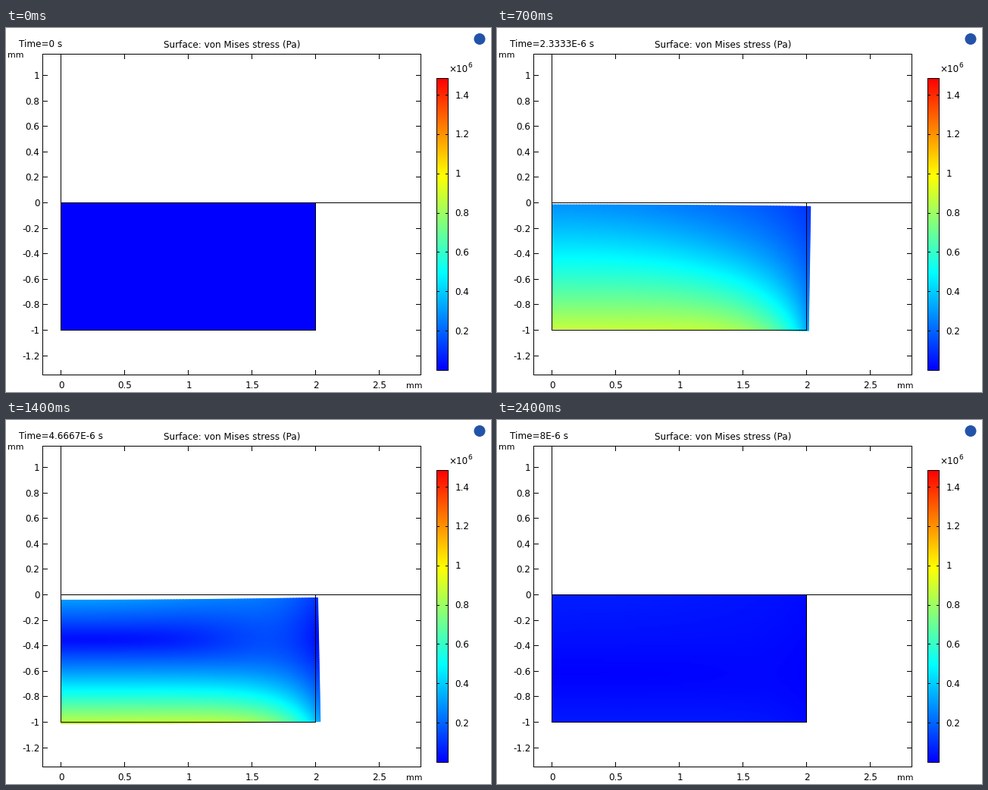
A matplotlib script for the animation above (2500 ms loop, 640 px wide and 480 px high).

```python
import numpy as np
import matplotlib.pyplot as plt
from matplotlib.animation import FuncAnimation
from matplotlib.colors import LinearSegmentedColormap
from matplotlib.patches import Circle, Rectangle

W, H, DPI = 640, 480, 100
PT = 72 / DPI                 # points per pixel
X0, Y0, UNIT = 72, 230, 168   # pixel of the point (0, 0), pixels per mm
VMAX = 1.485                  # MPa at the top of the colour bar
FRAMES = 25

plt.rcParams["font.family"] = "DejaVu Sans"
rainbow = LinearSegmentedColormap.from_list(
    "rainbow", ["#0000ff", "#00ffff", "#ffff00", "#ff0000"], N=512)

fig = plt.figure(figsize=(W / DPI, H / DPI), dpi=DPI, facecolor="white")
ax = fig.add_axes([0, 0, 1, 1])
ax.set_xlim(0, W)
ax.set_ylim(H, 0)
ax.axis("off")


# Whole pixel coordinates: hairlines snap to the centre of that pixel.
def line(xs, ys):
    ax.plot(xs, ys, color="black", lw=PT, antialiased=False, zorder=3)


def box(x, y, w, h):
    ax.add_patch(Rectangle((x, y), w, h, fill=False, ec="black", lw=PT,
                           antialiased=False, zorder=3))


def label(x, y, s, size=12, ha="left"):
    return ax.text(x, y, s, size=size * PT, ha=ha, va="baseline", zorder=4)


def spline(xs, vs, x):
    """Cubic Hermite curve through the rows of vs."""
    m = np.gradient(vs, xs, axis=0)
    i = min(np.searchsorted(xs, x, "right"), len(xs) - 1) - 1
    h = xs[i + 1] - xs[i]
    u = (x - xs[i]) / h
    return ((1 + 2 * u) * (1 - u) ** 2 * vs[i] + u * (1 - u) ** 2 * h * m[i]
            + u * u * (3 - 2 * u) * vs[i + 1] + u * u * (u - 1) * h * m[i + 1])


# Strength over time of the mean load, the bending swing and the bow (mm)
STEPS = np.array([0, 3, 5, 7, 10, 14, 17, 24])
LOAD = [0, .03, .20, .58, .125, .29, .05, .005]
SWING = [0, .02, .10, .30, 1.04, .59, .61, .07]
BOW = [0, 0, 0, -.014, -.030, .018, .018, 0]
KEYS = np.column_stack([LOAD, SWING, BOW])

r, d = np.meshgrid(np.linspace(0, 1, 85), np.linspace(0, 1, 61))
PROFILE = 1 - 2 * d + 0.6 * d * (1 - d)          # bending through the depth
FADE = 1 - 0.65 * r ** (2 + 5 * d ** 2)          # towards the free end
SHEAR = 0.05 + 0.2 * np.sin(np.pi * r ** 3)


def plate(n):
    """Deformed pixel grid and von Mises stress in MPa."""
    load, swing, bow = spline(STEPS, KEYS, n)
    bend = swing * np.cos(2 * np.pi * (n - 10.4) / 7.2)
    vm = np.hypot((load + bend * PROFILE) * FADE, bend * SHEAR)
    push = np.exp(-((n - 10.6) / 3.05) ** 2)
    dx = r * (0.095 * push + 1.1 * bow * (d - 0.5))
    dy = bow * (r ** 2 - 0.7) - 0.1 * push * (1 - d)
    x = X0 + 0.5 + UNIT * (2 * r + dx)
    y = Y0 + 0.5 + UNIT * (d - dy)
    return x, y, vm


def time_text(n):
    if n == 0:
        return "Time=0 s"
    value, power = (n / 3, 6) if n >= 3 else (n * 10 / 3, 7)
    return f"Time={value:.5g}E-{power} s"


# Axes frame, ticks and labels
L, R, T, B = 48, 547, 34, 457
box(L, T, R - L, B - T)
for k in range(6):
    x = X0 + k * UNIT / 2
    line([x, x], [B, B - 6])
    line([x, x], [T, T + 6])
    label(x + 1, 475, f"{k / 2:g}", ha="center")
for k in range(-6, 6):
    y = Y0 - k * UNIT / 5
    line([L, L + 6], [y, y])
    line([R - 6, R], [y, y])
    label(44.5, y + 5, f"{k / 5:g}", ha="right")
label(2, 39, "mm", 11)
label(528, 475, "mm", 11)
label(298.5, 26, "Surface: von Mises stress (Pa)", ha="center")
clock = label(17, 25, "")

# Undeformed outline and symmetry axes
box(X0, Y0, 2 * UNIT, UNIT)
line([X0, X0], [T, Y0])
line([X0, R], [Y0, Y0])

# Colour bar
BX, BW, BT, BB = 568, 15, 66, 451
ax.imshow(np.linspace(1, 0, BB - BT)[:, None], cmap=rainbow, aspect="auto",
          extent=(BX, BX + BW, BB, BT), zorder=2)
box(BX, BT, BW, BB - BT)
for k in range(1, 8):
    y = BB - k * 0.2 / VMAX * (BB - BT)
    line([BX, BX + 3], [y, y])
    line([BX + BW - 3, BX + BW], [y, y])
    label(592.5, y + 4.5, f"{k / 5:g}")
label(584, 58, "×10")
label(609.5, 52, "6", 9)

ax.add_patch(Circle((625, 14.5), 7.5, color="#2353a8", lw=0, zorder=2))

surface = []


def draw(n):
    while surface:
        surface.pop().remove()
    x, y, vm = plate(n)
    surface.append(ax.pcolormesh(x, y, vm, cmap=rainbow, vmin=0, vmax=VMAX,
                                 shading="gouraud", zorder=1))
    clock.set_text(time_text(n))
    return surface + [clock]


anim = FuncAnimation(fig, draw, frames=FRAMES, interval=100, repeat=True,
                     repeat_delay=0, blit=False)
plt.show()
```
